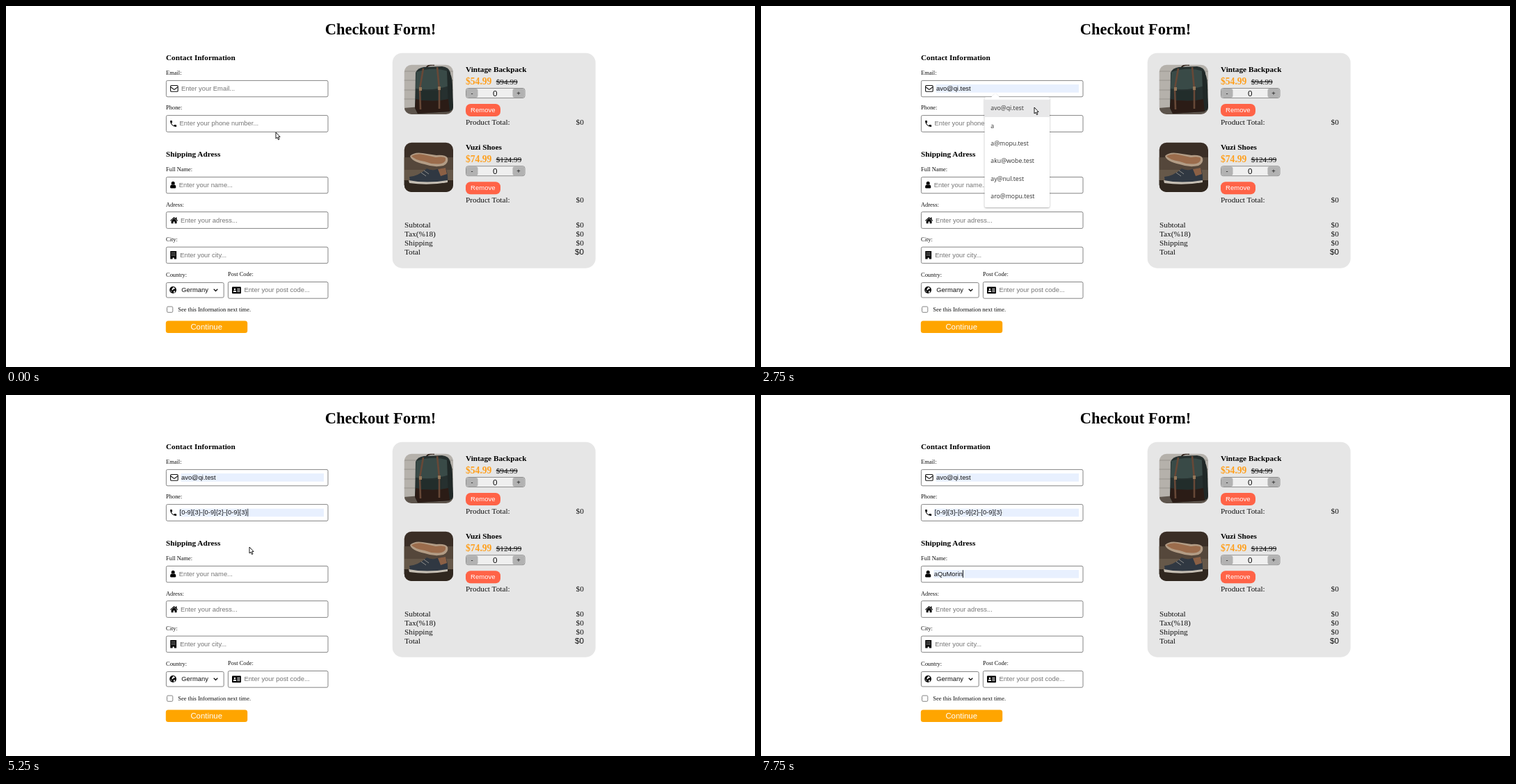
Animation of 1077x520 px, one loop 8000 ms. Source, as an HTML page:

```html
<!DOCTYPE html>
<html lang="en">
<head>
<meta charset="utf-8">
<title>Checkout Form</title>
<style>
html, body { margin: 0; width: 100%; height: 100%; overflow: hidden; background: #fff; }
svg { display: block; width: 100%; height: 100%; }
text { font: 11.25px "Liberation Serif", "Times New Roman", serif; fill: #111; white-space: pre; }
.b { font-weight: bold; fill: #000; }
.title { font-size: 22.5px; }
.label text { font-size: 8.45px; }
.ui, .hint text, .value text { font: 9.38px "Liberation Sans", Arial, sans-serif; }
.hint text { fill: #757575; }
.value text { fill: #111; }
.big { font-size: 11.7px; }
.mid { text-anchor: middle; }
.end { text-anchor: end; }
.white { fill: #fff; }
.price { font-size: 13.6px; font-weight: bold; fill: #ffa01e; }
.box { fill: #fff; stroke: #767676; stroke-width: .9; }
.fill { fill: #e8f0fe; }
.caret { fill: #000; }
.list { filter: drop-shadow(0 1px 1.3px rgba(0, 0, 0, .32)); }
.list text { font: 8.75px "Open Sans", "Noto Sans", sans-serif; fill: #333; }
.hover { fill: #e8e8e9; }

/* every change is a hard cut on a quarter-second beat */
.t { animation: 8s step-end infinite; }
.mailHint { animation-name: mailHint; }
.mailTyped { animation-name: mailTyped; }
.mailFull { animation-name: mailFull; }
.mailCaret { animation-name: mailCaret; }
.mailList { animation-name: mailList; }
.mailHover { animation-name: mailHover; }
.telHint { animation-name: telHint; }
.telFill { animation-name: telFill; }
.telShort { animation-name: telShort; }
.telFull { animation-name: telFull; }
.telCaret { animation-name: telCaret; }
.telList { animation-name: telList; }
.telHover { animation-name: telHover; }
.nameHint { animation-name: nameHint; }
.nameFull { animation-name: nameFull; }
.nameCaret { animation-name: nameCaret; }
.nameList { animation-name: nameList; }
.nameHover { animation-name: nameHover; }
.pointer { animation-name: pointer; }

@keyframes mailHint { 0% { visibility: visible } 12.5%, 100% { visibility: hidden } }
@keyframes mailTyped { 0% { visibility: hidden } 12.5% { visibility: visible } 34.375%, 100% { visibility: hidden } }
@keyframes mailFull { 0% { visibility: hidden } 34.375%, 100% { visibility: visible } }
@keyframes mailCaret {
  0% { visibility: hidden; transform: none }
  9.375% { visibility: visible; transform: none }
  12.5% { visibility: visible; transform: translateX(5.3px) }
  34.375% { visibility: hidden; transform: none }
  37.5% { visibility: visible; transform: translateX(47px) }
  43.75%, 100% { visibility: hidden; transform: none }
}
@keyframes mailList { 0% { visibility: hidden } 15.625% { visibility: visible } 37.5%, 100% { visibility: hidden } }
@keyframes mailHover { 0% { opacity: 0 } 34.375%, 100% { opacity: 1 } }

@keyframes telHint { 0% { visibility: visible } 53.125%, 100% { visibility: hidden } }
@keyframes telFill { 0% { visibility: hidden } 53.125%, 100% { visibility: visible } }
@keyframes telShort { 0% { visibility: hidden } 53.125% { visibility: visible } 56.25%, 100% { visibility: hidden } }
@keyframes telFull { 0% { visibility: hidden } 56.25%, 100% { visibility: visible } }
@keyframes telCaret {
  0% { visibility: hidden; transform: none }
  43.75% { visibility: visible; transform: none }
  53.125% { visibility: hidden; transform: none }
  59.375% { visibility: visible; transform: translateX(97.5px) }
  78.125%, 100% { visibility: hidden; transform: none }
}
@keyframes telList { 0% { visibility: hidden } 46.875% { visibility: visible } 59.375%, 100% { visibility: hidden } }
@keyframes telHover {
  0% { opacity: 0; transform: none }
  53.125% { opacity: 1; transform: none }
  56.25%, 100% { opacity: 1; transform: translateY(25.4px) }
}

@keyframes nameHint { 0% { visibility: visible } 87.5%, 100% { visibility: hidden } }
@keyframes nameFull { 0% { visibility: hidden } 87.5%, 100% { visibility: visible } }
@keyframes nameCaret {
  0% { visibility: hidden; transform: none }
  78.125% { visibility: visible; transform: none }
  87.5% { visibility: hidden; transform: none }
  90.625%, 100% { visibility: visible; transform: translateX(41px) }
}
@keyframes nameList { 0% { visibility: hidden } 81.25% { visibility: visible } 90.625%, 100% { visibility: hidden } }
@keyframes nameHover { 0% { opacity: 0 } 87.5%, 100% { opacity: 1 } }

@keyframes pointer {
  0% { visibility: visible; transform: translate(388px, 182px) }
  3.125% { visibility: visible; transform: translate(377px, 146px) }
  6.25% { visibility: hidden; transform: translate(363px, 120px) }
  25% { visibility: visible; transform: translate(705px, 212px) }
  28.125% { visibility: visible; transform: translate(550px, 186px) }
  31.25% { visibility: visible; transform: translate(436px, 158px) }
  34.375% { visibility: visible; transform: translate(393px, 146px) }
  40.625% { visibility: hidden; transform: translate(380px, 168px) }
  53.125% { visibility: visible; transform: translate(360px, 194px) }
  56.25% { visibility: visible; transform: translate(350px, 219px) }
  71.875% { visibility: visible; transform: translate(341px, 232px) }
  75% { visibility: visible; transform: translate(333px, 244px) }
  78.125% { visibility: hidden; transform: translate(333px, 256px) }
  87.5% { visibility: visible; transform: translate(340.5px, 280px) }
  93.75%, 100% { visibility: hidden; transform: translate(345px, 305px) }
}
</style>
</head>
<body>
<svg viewBox="0 0 1077 520">
  <defs>
    <clipPath id="photo"><rect x="572.7" y="84.7" width="70.3" height="71.3" rx="10.5"/></clipPath>
    <g id="buy">
      <rect x="661.5" y="118.5" width="84.5" height="14" rx="3" fill="#efefef" stroke="#858585" stroke-width=".9"/>
      <rect x="662" y="119" width="16.5" height="13" rx="3" fill="#b2b2b2"/>
      <rect x="728.5" y="119" width="17" height="13" rx="3" fill="#b2b2b2"/>
      <text class="ui mid" x="670" y="128.5">-</text>
      <text class="ui mid" x="737" y="128.5">+</text>
      <text class="ui mid big" x="703.3" y="129.5">0</text>
      <rect x="661" y="141" width="50" height="18" rx="7" fill="#ff6347"/>
      <text class="ui mid white" x="685.8" y="153" style="font-size:9.5px">Remove</text>
      <text x="661" y="171.3">Product Total:</text>
      <text class="end" x="830.8" y="171.3">$0</text>
    </g>
  </defs>

  <text class="b title mid" x="538.5" y="41">Checkout Form!</text>

  <!-- form -->
  <text class="b" x="230" y="78">Contact Information</text>
  <text class="b" x="230" y="217">Shipping Adress</text>
  <g class="label">
    <text x="230" y="99">Email:</text>
    <text x="230" y="149.3">Phone:</text>
    <text x="230" y="238.3">Full Name:</text>
    <text x="230" y="288.6">Adress:</text>
    <text x="230" y="339.2">City:</text>
    <text x="230" y="390.2">Country:</text>
    <text x="319" y="389.2">Post Code:</text>
    <text x="247.3" y="440">See this Information next time.</text>
  </g>
  <g class="box">
    <rect x="230.4" y="107.4" width="232.6" height="23.4" rx="2"/>
    <rect x="230.4" y="157.6" width="232.6" height="23.8" rx="2"/>
    <rect x="230.4" y="246.4" width="232.6" height="23.4" rx="2"/>
    <rect x="230.4" y="296.6" width="232.6" height="23.8" rx="2"/>
    <rect x="230.4" y="347.2" width="232.6" height="23.4" rx="2"/>
    <rect x="230.4" y="398.5" width="82.8" height="21.5" rx="2"/>
    <rect x="319.4" y="397.5" width="143.6" height="23.7" rx="2"/>
    <rect x="231.5" y="433" width="8.3" height="8.3" rx="1.6"/>
  </g>

  <!-- icons -->
  <rect x="236.6" y="114.5" width="10.6" height="8.8" rx="1.3" fill="none" stroke="#111" stroke-width="1.1"/>
  <path d="M236.8 116.6l4 3.2q1.1.8 2.2 0l4-3.2" fill="none" stroke="#111" stroke-width="1.1"/>
  <path transform="translate(234.6 163.5) scale(.5)" d="M6.6 10.8c1.4 2.8 3.8 5.1 6.6 6.6l2.2-2.2q.5-.5 1-.3 1.7.6 3.6.6 1 0 1 1V20q0 1-1 1C10.6 21 3 13.4 3 4q0-1 1-1h3.5q1 0 1 1 0 1.9.6 3.6.2.6-.3 1z"/>
  <circle cx="240.2" cy="255.2" r="2.5"/>
  <path d="M238 257.2q2.2 1.4 4.4 0 2 .7 2 3.7 0 1.7-1.7 1.7h-5q-1.700 0-1.7-1.7 0-3 2-3.7z"/>
  <path d="M236 309l5.6-5 2.4 2.1v-1.6h1.5v3l1.7 1.5-.7.7-4.9-4.3-4.9 4.3zM237.7 309.4l3.9-3.4 3.9 3.4v3.8h-2.9v-2.8h-2v2.8h-2.9z"/>
  <path d="M236.3 353h8.8v11.4h-3.3v-2h-2.2v2h-3.3z"/>
  <path d="M238 355.2h5.5M238 357.4h5.5M238 359.6h5.5" stroke="#fff" stroke-width=".8" stroke-dasharray=".9 .63"/>
  <circle cx="240.1" cy="409" r="4.9"/>
  <path d="M240.3 405l2.6 1.1-.6 1.7-1.9.5-.9 1.3-1.4-1zM241.2 410.3l2.1.2-1 2.2-1.3.3zM236.2 409.3l1.9 1.5-.2 1.4z" fill="#fff"/>
  <rect x="325" y="404.5" width="13" height="9.7" rx="1"/>
  <circle cx="328.9" cy="408" r="1.3" fill="#fff"/>
  <path d="M326.6 411.9q0-2.2 2.3-2.2t2.3 2.2zM332.4 407h4v1h-4zM332.4 409h4v1h-4zM332.4 411h4v.9h-4z" fill="#fff"/>
  <path d="M298.7 407.8l2.8 2.7 2.8-2.7" fill="none" stroke="#111" stroke-width="1.3"/>

  <g class="hint">
    <text class="t mailHint" x="252" y="122">Enter your Email...</text>
    <text class="t telHint" x="249.6" y="172.4">Enter your phone number...</text>
    <text class="t nameHint" x="248.8" y="261">Enter your name...</text>
    <text x="251" y="311.6">Enter your adress...</text>
    <text x="250.2" y="362">Enter your city...</text>
    <text x="342.4" y="412.4">Enter your post code...</text>
  </g>
  <text class="ui" x="252.3" y="412.3">Germany</text>
  <rect x="229.8" y="453.5" width="117.4" height="17.6" rx="3.5" fill="#ffa500"/>
  <text class="ui mid white" x="288.2" y="466" style="font-size:11.4px">Continue</text>

  <!-- typed values -->
  <g class="value">
    <text class="t mailTyped" x="252" y="122">a</text>
    <g class="t mailFull">
      <rect class="fill" x="251.5" y="113" width="205.5" height="11.7"/>
      <text x="252" y="122">avo@qi.test</text>
    </g>
    <rect class="fill t telFill" x="249" y="163.7" width="208" height="11.6"/>
    <text class="t telShort" x="249.6" y="172.4">f</text>
    <text class="t telFull" x="249.6" y="172.4">[0-9]{3}-[0-9]{2}-[0-9]{3}</text>
    <g class="t nameFull">
      <rect class="fill" x="248.5" y="252" width="208.5" height="11.7"/>
      <text x="248.8" y="261">aQuMorin</text>
    </g>
  </g>
  <g class="caret">
    <rect class="t mailCaret" x="252" y="113.2" width=".9" height="11"/>
    <rect class="t telCaret" x="249.6" y="163.8" width=".9" height="11"/>
    <rect class="t nameCaret" x="248.9" y="252.2" width=".9" height="11"/>
  </g>

  <!-- order summary -->
  <rect x="555.7" y="67.7" width="292" height="310" rx="14" fill="#e6e6e6"/>
  <g clip-path="url(#photo)">
    <path d="M572 84h72v73h-72z" fill="#b5b1ab"/>
    <path d="M572 94h72M572 107h72M572 121h72M572 134h72" stroke="#98948d" stroke-width="1.2"/>
    <path d="M572 147l72-6v16h-72z" fill="#5d544c"/>
    <path d="M604 90q2-6 12-5" fill="none" stroke="#2c1e17" stroke-width="2"/>
    <path d="M589 96q3-7 12-8l26-1q10 1 12 9l4 50-5 6-46 3-4-8z" fill="#26302f"/>
    <path d="M590 95q24-8 46-1l1 21q-24 8-48 4z" fill="#394a47"/>
    <path d="M634 92q8 6 8 22l1 35-7 3z" fill="#202827"/>
    <path d="M589 134q25 5 47 0l2 18-46 3-4-8z" fill="#2b1c16"/>
    <path d="M594 122h32v14h-32z" fill="#222d2b"/>
    <path d="M600 90l-5 29 1 30M620 88l3 31v29" fill="none" stroke="#674837" stroke-width="2.6"/>
    <path d="M594 117h4v5h-4zM621 116h4v5h-4z" fill="#94775a"/>
  </g>
  <text class="b" x="661" y="95">Vintage Backpack</text>
  <text class="price" x="661" y="112.7">$54.99</text>
  <text x="704.7" y="112.5" text-decoration="line-through">$94.99</text>
  <use href="#buy"/>

  <g transform="translate(0 112)" clip-path="url(#photo)">
    <path d="M572 84h72v73h-72z" fill="#3a2e26"/>
    <path d="M572 106h72v18h-72z" fill="#55473b"/>
    <path d="M572 124h72v16h-72z" fill="#665849"/>
    <path d="M572 139h72v18h-72z" fill="#30271f"/>
    <path d="M581 104q6-6 18-4l20 3q13-1 16 4 2 7-6 11-13 3-27-2-19-4-21-12z" fill="#b29c85"/>
    <path d="M583 104q8-4 17-2l18 4q11-2 14 1 1 6-6 8-12 2-24-3-16-3-19-8z" fill="#9b6c4c"/>
    <path d="M580 134q13-1 25-12 8 4 15 1l12-2q4 9 3 20-26 4-54 0z" fill="#303842"/>
    <path d="M621 123l11-2 2 9-9 3z" fill="#8b6045"/>
    <path d="M597 128l7 5M601 125l7 5" stroke="#a9a6a0" stroke-width=".8"/>
    <path d="M579 139q26 5 56 0v3q-28 5-55 1z" fill="#c5beb3"/>
  </g>
  <text class="b" x="661" y="207">Vuzi Shoes</text>
  <text class="price" x="661" y="224.7">$74.99</text>
  <text x="704.7" y="224.5" text-decoration="line-through">$124.99</text>
  <use href="#buy" y="112.2"/>

  <text x="573" y="319">Subtotal</text>
  <text x="573" y="332">Tax(%18)</text>
  <text x="573" y="345">Shipping</text>
  <text x="573" y="358">Total</text>
  <g class="end">
    <text x="830.8" y="319">$0</text>
    <text x="830.8" y="332">$0</text>
    <text x="830.8" y="345">$0</text>
    <text class="ui big" x="831" y="358">$0</text>
  </g>

  <!-- suggestion lists -->
  <g class="list t mailList">
    <path d="M323.5 131.3h7.5l6-5.500 6 5.5h70q2 0 2 2v154.700q0 2-2 2h-89.5q-2 0-2-2v-154.700q0-2 2-2z" fill="#fff"/>
    <rect class="hover t mailHover" x="321.5" y="134.8" width="93.5" height="25.2"/>
    <text y="150.3"><tspan x="330.3">avo@qi.test</tspan><tspan x="330.3" dy="25.35">a</tspan><tspan x="330.3" dy="25.35">a@mopu.test</tspan><tspan x="330.3" dy="25.35">aku@wobe.test</tspan><tspan x="330.3" dy="25.35">ay@nul.test</tspan><tspan x="330.3" dy="25.35">aro@mopu.test</tspan></text>
  </g>
  <g class="list t telList">
    <path d="M321 180.7h8l6-5.500 6 5.5h104.5q2 0 2 2v54.300q0 2-2 2h-124.5q-2 0-2-2v-54.300q0-2 2-2z" fill="#fff"/>
    <rect class="hover t telHover" x="319" y="184" width="128.5" height="25.2"/>
    <text y="200"><tspan x="328">f</tspan><tspan x="328" dy="25.4">[0-9]{3}-[0-9]{2}-[0-9]{3}</tspan></text>
  </g>
  <g class="list t nameList">
    <path d="M319.5 270.200h8l6-5.500 6 5.500h45q2 0 2 2v154.300q0 2-2 2h-65q-2 0-2-2v-154.300q0-2 2-2z" fill="#fff"/>
    <rect class="hover t nameHover" x="317.5" y="273" width="69" height="25"/>
    <text y="289"><tspan x="326.3">aQuMorin</tspan><tspan x="326.3" dy="25.35">aquvonde</tspan><tspan x="326.3" dy="25.35">afa</tspan><tspan x="326.3" dy="25.35">dad</tspan><tspan x="326.3" dy="25.35">a</tspan><tspan x="326.3" dy="25.35">asd</tspan></text>
  </g>

  <path class="t pointer" d="M0 0v9l2-1.8 1.5 3.4 1.5-.7-1.5-3.2 2.6-.2z" fill="#fff" stroke="#000" stroke-width=".9"/>
</svg>
</body>
</html>
```
